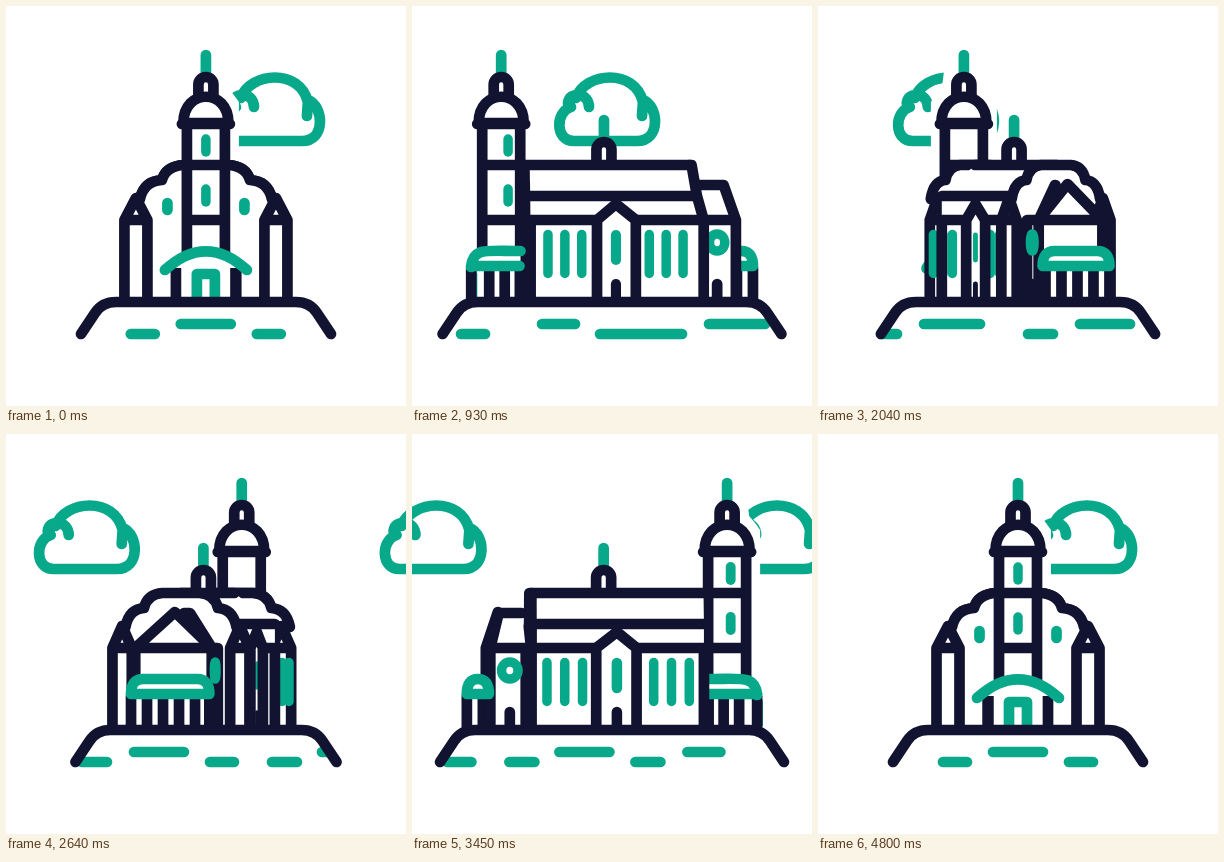
An HTML page with a canvas for the animation above (4830 ms loop, 400 by 400 pixels).

```html
<!DOCTYPE html>
<html lang="en">
<head>
<meta charset="utf-8">
<title>Turning church</title>
<style>
html, body { margin: 0; width: 100%; height: 100%; overflow: hidden; background: #fff; }
canvas { display: block; width: 100vmin; height: 100vmin; }
</style>
</head>
<body>
<canvas id="stage" width="400" height="400"></canvas>
<script>
const ctx = document.getElementById('stage').getContext('2d');
const NAVY = '#121331', GREEN = '#08a88a';
const TURN = 4800, LOOP = 4830, QUARTER = TURN / 4;
const LINE = 10.7;

const lerp = (a, b, k) => a + (b - a) * k;

// Cubic bezier easing, solved by bisection
function bezier(x1, y1, x2, y2) {
  const at = (a, b, s) => 3 * (1 - s) * (1 - s) * s * a + 3 * (1 - s) * s * s * b + s * s * s;
  return u => {
    if (u <= 0) return 0;
    if (u >= 1) return 1;
    let lo = 0, hi = 1;
    for (let i = 0; i < 24; i++) {
      const mid = (lo + hi) / 2;
      if (at(x1, x2, mid) < u) lo = mid; else hi = mid;
    }
    return at(y1, y2, lo);
  };
}
const swing = bezier(.167, .167, .48, 1);
const widen = bezier(.35, 0, .5, 1);
const speedUp = bezier(.18, 0, .833, .833);

// Scrolled share of one turn: slows down at each side view
function scrollAt(t) {
  const q = Math.min(3, Math.floor(t / QUARTER));
  const u = t / QUARTER - q;
  return (q + (q % 2 ? speedUp(u) : 1 - speedUp(1 - u))) / 4;
}

function paint(path, color, width = LINE, fill) {
  const p = typeof path === 'string' ? new Path2D(path) : path;
  if (fill) { ctx.fillStyle = '#fff'; ctx.fill(p); }
  ctx.strokeStyle = color;
  ctx.lineWidth = width;
  ctx.stroke(p);
}
function blank(path) {
  ctx.fillStyle = '#fff';
  ctx.fill(new Path2D(path));
}
const bar = (x, y1, y2, color, width) => paint(`M${x} ${y1}V${y2}`, color, width);

// Moves drawing to x, or mirrors it around x
function at(x, draw, flip = 1) {
  ctx.save();
  ctx.translate(x, 0);
  ctx.scale(flip, 1);
  draw();
  ctx.restore();
}

function cloud(x) {
  at(x, () => paint('M-36 101C-52 106-52 135-33 135H30C54 135 52 100 36 94' +
    'M-39 97C-38 85-18 86-18 101M-31 92C-22 66 28 62 36 96L35 110', GREEN));
}

function halo(x) {
  at(x, () => blank('M-20 66H20L22 82 28 89 33 96V160H-33V96L-28 89-22 82Z'));
}

function lantern(top, foot) {
  paint(`M-7.5 ${foot}V${top}a7.5 7.5 0 0 1 15 0V${foot}`, NAVY, LINE, true);
}

function tower(p) {
  at(p.towerX, () => {
    bar(0, 49, 68, GREEN);
    lantern(78.5, 90);
    blank('M-19 118H19V296H-19Z');
    ctx.save();
    ctx.beginPath();
    ctx.rect(-20, 118, 40, 180);
    ctx.clip();
    for (const y of [133, 183]) {
      if (p.c > 0) bar(-28 * p.s, y, y + 13, GREEN, 9.5);
      if (p.s > .05) bar(20 * p.c, y, y + 13, GREEN, 10 * p.s);
    }
    ctx.restore();
    paint('M-19 118V292M19 118V292M-19 159H19M-19 214H19', NAVY);
    paint('M-22.5 117C-22.5 82 22.5 82 22.5 117ZM-24 118H24', NAVY, LINE, true);
  });
}

function frontPorch(p) {
  const k = p.k, kk = k * k, o = -(30 + 11 * k), i = 19 + 22 * k;
  at(p.towerX, () => {
    const endY = lerp(245, 264, kk);
    const roof = `M${o} ${lerp(261, 264, kk)}C${lerp(o + 2, o + 27, kk)} ${lerp(241, 239, kk)} ` +
      `${lerp(o + 14, i - 27, kk)} ${lerp(245, 239, kk)} ${i} ${endY}`;
    blank(`${roof}V264H${i - 11 * k}V294H-30V264Z`);
    const door = 9 * k;
    ctx.lineCap = 'butt';
    paint(`M${-31 * p.s - door} 292V268H${-31 * p.s + door}V292`, GREEN);
    for (const x of [-30, lerp(-12, 30, kk), lerp(3.5, 30, kk), 18.5 + 11.5 * k])
      bar(x, 262, 296, NAVY);
    ctx.lineCap = 'round';
    const from = lerp(o, i, Math.min(1, 1.6 * k));
    if (from < i - 4) paint(`M${from} 260H${i - 1}`, GREEN);
    paint(roof, GREEN);
  });
}

function backPorch(p) {
  const o = 30 + 11 * p.k, i = 8 - 56 * p.k;
  const bend = Math.min(12, (o - i) / 2);
  at(400 - p.towerX, () => {
    blank(`M${i} 260H${o}V296H${i}Z`);
    for (let n = 0; n < 6; n++) bar(Math.max(i, o - 16 * n), 262, 294, NAVY);
    paint(`M${o} 260Q${o} 245 ${o - bend} 245H${i + bend}Q${i} 245 ${i} 260Z`, GREEN, LINE, true);
  });
}

function facade(p, x, front) {
  const k = p.k, far = front !== p.c > 0;
  const side = 70 * k * (far ? .8 : 1), h = 11.5 * k;
  const X = v => v * k;
  at(x, () => {
    const gable = `M${X(-66)} 193Q${X(-62)} 175 ${X(-44)} 174Q${X(-40)} 160 ${X(-22)} 159` +
      `H${X(22)}Q${X(40)} 160 ${X(44)} 174Q${X(62)} 175 ${X(66)} 193`;
    blank(`${gable}L${side} 296H${-side}Z`);
    paint(gable, NAVY);
    if (front && k > .02)
      for (const sx of [-38.5, 38.5]) bar(X(sx), 197, 204, GREEN);
    for (const sx of [-side, side])
      paint(`M${sx - h} 294V214L${sx} 192 ${sx + h} 214V294M${sx - h} 214H${sx + h}`, NAVY, LINE, true);
  });
}

function nave(p) {
  const P = p.at;
  const ridgeF = P(0, 93), ridgeB = P(0, -84);
  const eaveF = P(.68, 91), eaveB = P(.5, -86), wallB = P(.65, -92);
  const gL = P(.83, 22), gR = P(.83, -19), peak = P(.83, 2);
  blank(`M${ridgeF} 159H${ridgeB}L${eaveB} 190 ${wallB} 214V296H${eaveF}V190Z`);
  for (const z of [75, 57, 39, -33, -51, -69])
    bar(P(.9 + z / 800, z), 228.5, 267.5, GREEN, 9.5);
  paint(`M${ridgeF} 159H${ridgeB}L${eaveB} 190 ${wallB} 214V294M${eaveF} 190H${eaveB}` +
    `M${eaveF} 294V214H${gL}M${gR} 214H${wallB}`, NAVY);
  blank(`M${gL} 296V214L${peak} 198 ${gR} 214V296Z`);
  bar(peak, 229, 254, GREEN, LINE * p.s);
  bar(peak, 278, 294, NAVY, LINE * p.s);
  paint(`M${gL} 294V214L${peak} 198 ${gR} 214V294`, NAVY);
}

function apse(p) {
  const P = p.at, kk = p.k * p.k;
  const endZ = 24 * kk - 126, topZ = 20 * kk - 116;
  const near = P(.65, endZ), far = P(-.62, endZ);
  if (p.c < 0)
    paint(`M${far} 294V214L${P(0, topZ)} 178 ${near} 214V294M${far} 214H${near}`, NAVY, LINE, true);
  if (p.s > .2) {
    const wall = P(.65, -90), ridge = P(.1, -92), top = P(.25, topZ);
    const round = lerp(wall, near, .45);
    blank(`M${ridge} 178H${top}L${near} 214V296H${wall}V214Z`);
    paint(`M${ridge} 179H${top}L${near} 214V294M${wall} 294V214H${near}`, NAVY);
    const ring = new Path2D();
    ring.ellipse(round, 236.5, 8.5 * p.s * p.s, 8.5, 0, 0, 7);
    paint(ring, GREEN, 9.5);
    bar(round, 278, 294, NAVY);
  }
}

function ridgeTurret(p, flip) {
  at(200 - 8.5 * p.s * flip, () => {
    bar(0, 114, 132, GREEN);
    lantern(143.5, 158);
  });
}

// Dashes lie on a belt that repeats after one turn: start, end
const BELT = 947;
const DASHES = {
  318: [[19, 62], [170, 230], [327, 370], [494, 560], [650, 710], [838, 898]],
  328: [[-33, 2], [120, 154], [246, 280], [385, 477], [598, 633], [726, 760], [788, 823]]
};

function ground(half, scroll) {
  const l = 200 - half, r = 200 + half;
  const hill = `M${l} 328L${l + 14} 307Q${l + 21} 296 ${l + 35} 296H${r - 35}Q${r - 21} 296 ${r - 14} 307L${r} 328`;
  ctx.save();
  ctx.clip(new Path2D(`${hill}V345H${l}Z`));
  for (const y in DASHES)
    for (const [a, b] of DASHES[y])
      for (const turn of [0, BELT]) {
        const x = turn - BELT * scroll;
        paint(`M${a + x + 5} ${y}H${b + x - 5}`, GREEN);
      }
  ctx.restore();
  paint(hill, NAVY);
}

function poseAt(t) {
  const v = t / QUARTER;
  const side = v < 1 ? v : 2 - v;
  const s = swing(side);
  const c = swing(1 - side) * (v < 1 ? 1 : -1);
  const reach = 70 * c ** 4 * Math.sign(c) + 20 * c * (1 - c * c);
  return {
    s, c, k: c ** 4,
    towerX: 200 - 117 * s,
    half: 125 + 48 * widen(side),
    at: (w, z) => 200 + w * reach - z * s
  };
}

function draw(time) {
  const t = Math.min(time % LOOP, TURN);
  const flip = t > TURN / 2 ? -1 : 1;
  const p = poseAt(flip > 0 ? t : TURN - t);
  const scroll = scrollAt(t);

  ctx.fillStyle = '#fff';
  ctx.fillRect(0, 0, 400, 400);
  ctx.lineCap = ctx.lineJoin = 'round';

  cloud(266 - 333 * scroll);
  cloud(266 + 362 * (1 - scroll));

  at(flip > 0 ? 0 : 400, () => {
    const front = () => facade(p, 200 - 93 * p.s, true);
    const back = () => facade(p, 200 + 82 * p.s, false);
    halo(p.towerX);
    if (p.c > 0) {
      backPorch(p); back(); apse(p);
      ridgeTurret(p, flip); nave(p);
      front(); tower(p); frontPorch(p);
    } else {
      tower(p); frontPorch(p); front();
      ridgeTurret(p, flip); nave(p);
      back(); apse(p); backPorch(p);
    }
  }, flip);

  ground(p.half, scroll);
}

const start = performance.now();
function tick() {
  draw(performance.now() - start);
  requestAnimationFrame(tick);
}
tick();
</script>
</body>
</html>
```
